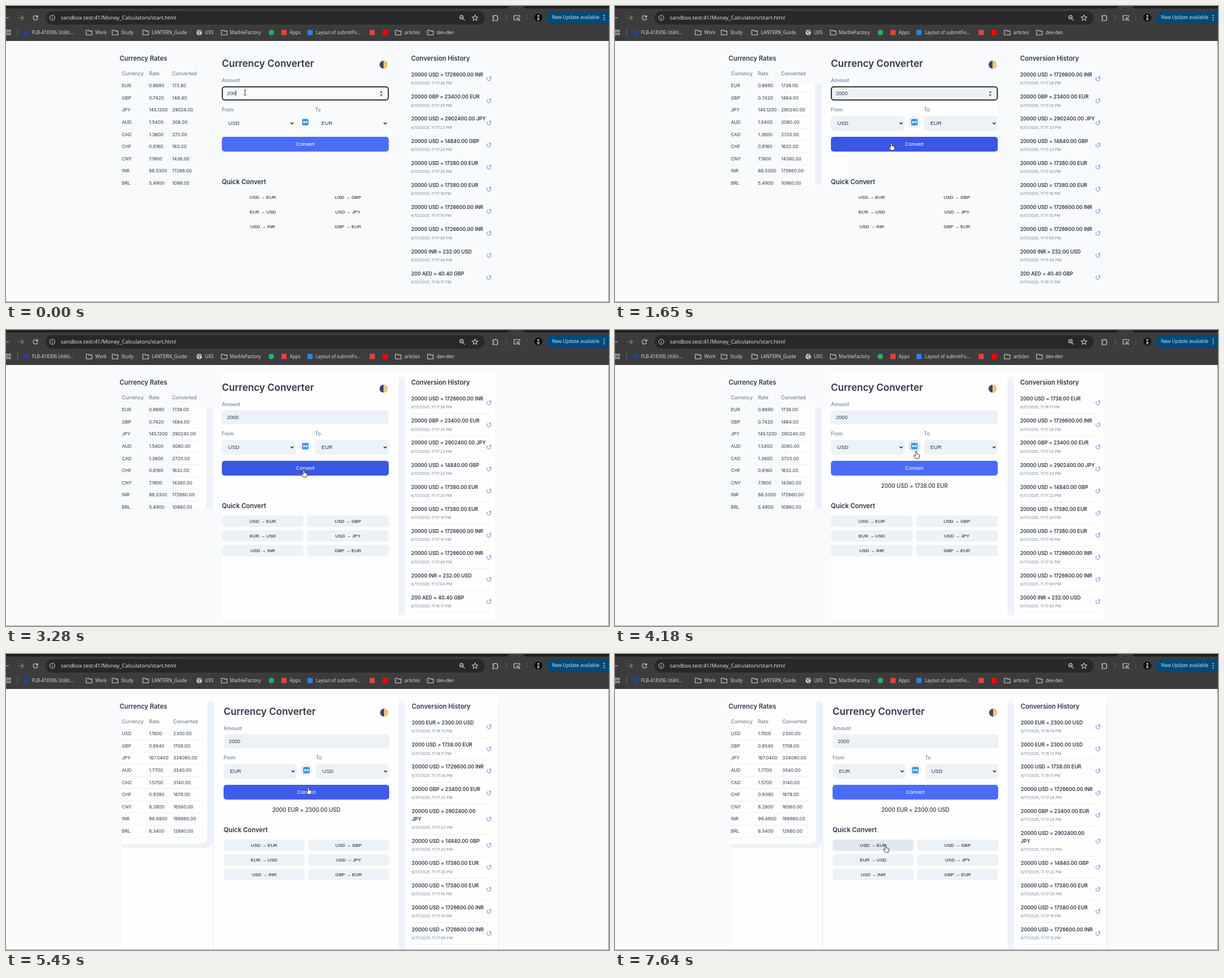
An HTML page with a canvas for the animation above (8 s loop, 1067 px wide and 525 px high).

```html
<!DOCTYPE html>
<html lang="en">
<head>
<meta charset="utf-8">
<title>Currency Converter</title>
<style>
html, body { margin: 0; width: 100%; height: 100%; overflow: hidden; background: #f8fafc; }
canvas { display: block; width: 1067px; height: 525px; }
</style>
</head>
<body>
<canvas id="stage"></canvas>
<script>
const W = 1067, H = 525, LOOP = 8000;
const canvas = document.getElementById('stage');
const ratio = window.devicePixelRatio || 1;
canvas.width = Math.round(W * ratio);
canvas.height = Math.round(H * ratio);
const c = canvas.getContext('2d');
c.scale(ratio, ratio);

const UI = 'Inter, sans-serif', FORM = '"Liberation Sans", Arial, sans-serif', BAR = '"Open Sans", sans-serif';
const INK = '#2d3748', MUTED = '#718096', FIELD = '#edf2f7', LINE = '#e6ebf1', CARD = '#fefefe', BLUE = '#4a6cf7';

// Screen updates: time, pointer x, pointer y
const steps = [
  [0, 423, 154], [180, 423, 154], [740, 424, 157], [920, 430, 172], [1100, 445, 198],
  [1280, 463, 225], [1460, 480, 241], [1650, 489, 243], [1820, 495, 247], [2000, 508, 252],
  [2180, 517, 253], [2360, 523, 250], [2730, 526, 249], [2910, 527, 248], [3280, 527, 248],
  [3460, 527, 248], [3830, 528, 246], [4010, 531, 226], [4180, 533, 215], [4360, 532, 211],
  [4540, 531, 207], [4910, 531, 207], [5090, 531, 212], [5270, 532, 224], [5450, 535, 236],
  [5630, 536, 239], [5810, 536, 240], [6370, 536, 240], [6920, 534, 247], [7100, 528, 272],
  [7280, 512, 315], [7460, 488, 348], [7640, 479, 339]
];

// Areas where the card surfaces become visible: time, x, y, w, h
const reveals = [
  [180, 306, 138, 106, 179], [740, 411, 148, 26, 20], [1280, 411, 148, 266, 110],
  [1820, 411, 150, 119, 117], [3280, 382, 73, 483, 439], [4910, 205, 73, 667, 452]
];

const codes = ['GBP', 'JPY', 'AUD', 'CAD', 'CHF', 'CNY', 'INR', 'BRL'];
const rates = {
  USD: [0.869, 0.742, 145.12, 1.54, 1.36, 0.816, 7.19, 86.33, 5.49],
  EUR: [1.15, 0.854, 167.04, 1.77, 1.57, 0.939, 8.28, 99.49, 6.34]
};

const log = [
  ['2000 EUR = 2300.00 USD', '18:14'], ['2000 EUR = 2300.00 USD', '18:13'],
  ['2000 USD = 1738.00 EUR', '18:11'], ['20000 USD = 1726600.00 INR', '17:26'],
  ['20000 GBP = 23400.00 EUR', '17:25'], ['20000 USD = 2902400.00 JPY', '17:23'],
  ['20000 USD = 14840.00 GBP', '17:22'], ['20000 USD = 17380.00 EUR', '17:20'],
  ['20000 USD = 17380.00 EUR', '17:18'], ['20000 USD = 1726600.00 INR', '17:10'],
  ['20000 USD = 1726600.00 INR', '17:08'], ['20000 INR = 232.00 USD', '17:04'],
  ['200 AED = 40.40 GBP', '16:17']
];

const quick = ['USD → EUR', 'USD → GBP', 'EUR → USD', 'USD → JPY', 'USD → INR', 'GBP → EUR'];

// y is the middle of the capitals
function text(s, x, y, size, color = INK, weight = 400, font = UI, align = 'left') {
  c.font = `${weight} ${size}px ${font}`;
  c.fillStyle = color;
  c.textAlign = align;
  c.fillText(s, x, y + size * 0.36);
}

function rect(x, y, w, h, color) {
  c.fillStyle = color;
  c.fillRect(x, y, w, h);
}

function round(x, y, w, h, r, color) {
  c.beginPath();
  c.roundRect(x, y, w, h, r);
  c.fillStyle = color;
  c.fill();
}

function disc(x, y, r, color) {
  c.beginPath();
  c.arc(x, y, r, 0, Math.PI * 2);
  c.fillStyle = color;
  c.fill();
}

function stroke(d, x, y, color, width = 1.2) {
  c.save();
  c.translate(x, y);
  c.strokeStyle = color;
  c.lineWidth = width;
  c.stroke(new Path2D(d));
  c.restore();
}

function fill(d, x, y, color) {
  c.save();
  c.translate(x, y);
  c.fillStyle = color;
  c.fill(new Path2D(d));
  c.restore();
}

function mix(a, b, k) {
  return `rgb(${a.map((v, i) => Math.round(v + (b[i] - v) * k))})`;
}

function browser() {
  const icon = '#d0d3d6';
  rect(0, 0, W, 62, '#3c3c3c');
  round(-10, -10, 900, 14.5, 5, '#1f2020');
  round(916, -10, 170, 14.5, 5, '#1f2020');
  round(70, 9, 777, 24, 12, '#282828');

  stroke('M5 0H-4M0-4L-4 0 0 4', 0, 21, icon);
  stroke('M-4 0H5M1-4L5 0 1 4', 26, 21, '#85888b');
  stroke('M3.6-2A4 4 0 1 0 4 1M4-4.5V-1.4H.8', 52, 21, icon);
  stroke('M-4.5 0A4.5 4.5 0 1 0 4.5 0A4.5 4.5 0 1 0-4.5 0M0-.5V2.5M0-2.5V-1.4', 82, 21, icon, 1);
  text('sandbox.test:41/Money_Calculators/start.html', 97, 21, 9.5, '#e8eaed', 400, BAR);

  stroke('M-4.2-1.2A3.1 3.1 0 1 0 2-1.2A3.1 3.1 0 1 0-4.2-1.2M1.2 1.2L4.8 4.8M-2.7-1.2H.5', 807, 21, icon);
  stroke('M0-5L1.5-1.7 5-1.4 2.3.9 3.1 4.4 0 2.6-3.1 4.4-2.3.9-5-1.4-1.5-1.7Z', 830, 21, icon, 1.1);
  stroke('M-4.5-3.5H-1.6A1.7 1.7 0 0 1 1.6-3.5H3.5V-.8A1.7 1.7 0 0 1 3.5 2.4V5H-4.5V2.4A1.6 1.6 0 0 0-4.5-.8Z', 866, 21, icon);
  rect(885, 15, 1, 12, '#5f6266');
  stroke('M-1 4H-5V-4H5V-1M0 1.8A2 2 0 1 0 4 1.8A2 2 0 1 0 0 1.8M3.6 3.4L5.6 5.2', 904, 21, icon);
  rect(921, 15, 1, 12, '#4d5053');

  disc(942, 20.5, 7, '#0b0b0b');
  disc(942, 17.5, 1.8, '#b5b5b5');
  round(940, 20, 4, 6, 2, '#8d8d8d');
  round(957, 9.5, 120, 22.5, 11, '#004a77');
  text('New Update available', 966, 20.5, 8.3, '#d3ebfd', 400, BAR);
  for (const dy of [-4, 0, 4]) disc(1058.5, 20.5 + dy, 1.1, '#d3ebfd');

  stroke('M-3.5-4.5H-.5V-1.5H-3.5ZM1.5-4.5H4.5V-1.5H1.5ZM-3.5 1H-.5V4H-3.5ZM1.5 1H4.5V4H1.5Z', 3.5, 47, icon, 1);
  rect(20, 41, 1, 12, '#6a6d70');
  disc(36, 47, 5, '#26418f');
  for (const x of [147, 193, 247, 386, 694, 751]) {
    stroke('M-5-4H-1.2L.2-2.6H5V4.2H-5Z', x, 47, icon, 1.1);
  }
  disc(342, 47, 4.8, icon);
  stroke('M-3.5-2L-1-.5 0 2 1 4M0-4.5L1-2 4-1', 342, 47, '#3c3c3c', 1.2);
  disc(469.5, 47, 4.8, '#1fb36b');
  for (const [x, color] of [[492, '#ea4335'], [538, '#2684ff'], [648, '#ea4335'], [671, '#ff0000']]) {
    rect(x - 4.5, 42.5, 9, 9, color);
  }
  const marks = [
    ['FLB-418306 Utiliti...', 46], ['Work', 158], ['Study', 204], ['LANTERN_Guide', 258], ['UX5', 352],
    ['MarbleFactory', 396], ['Apps', 502], ['Layout of submitFo...', 548], ['articles', 705], ['dev-den', 762]
  ];
  for (const [s, x] of marks) text(s, x, 47, 8.2, '#dfe1e4', 400, BAR);
}

function layout(swapped) {
  const x = swapped ? 385 : 382, r = swapped ? 678 : 677.3, mid = (x + r) / 2;
  return { x, r, w: r - x, mid, to: mid + 17, sel: mid - 17 - x, hist: swapped ? 718 : 717 };
}

function gap(x, w, open) {
  const g = c.createLinearGradient(0, 78, 0, 512);
  g.addColorStop(0, 'rgba(237,241,248,0)');
  g.addColorStop(0.03, '#edf1f8');
  g.addColorStop(0.97, '#edf1f8');
  g.addColorStop(1, open ? '#edf1f8' : 'rgba(237,241,248,0)');
  rect(x, 78, w, H - 78, g);
}

// Wrapped rows are one text line taller
function historyRows(s) {
  let y = 122;
  return log.slice(s.first, s.first + 10).map(([title, time]) => {
    const wrap = s.swapped && title.endsWith('JPY');
    const row = { y, time, lines: wrap ? [title.slice(0, -4), 'JPY'] : [title], extra: wrap ? 14.2 : 0 };
    y += 39.17 + row.extra;
    return row;
  });
}

function surfaces(s, L, rows) {
  c.save();
  c.beginPath();
  for (const [t, x, y, w, h] of reveals) if (s.t >= t) c.rect(x, y, w, h);
  c.clip();
  rect(0, 62, W, H, CARD);
  if (s.swapped) {
    round(190, 84, 176, 260, [0, 0, 14, 0], '#edf1f8');
    round(190, 70, 166, 266.5, [0, 0, 10, 0], CARD);
    gap(366, 2, true);
    gap(870, 2, true);
  } else {
    gap(354, 12, true);
  }
  gap(694.5, 11.5, s.swapped);

  for (let i = 0; i < 9; i++) rect(205, 152 + i * 21.58, s.swapped ? 139 : 137.5, 0.8, LINE);
  for (const r of rows) rect(L.hist, r.y + 26.2 + r.extra, 859 - L.hist, 0.8, LINE);

  round(L.x, 142.5, L.w, 25, 5, FIELD);
  round(L.x, 195, L.sel, 26, 5, FIELD);
  round(L.to, 195, L.sel, 26, 5, FIELD);
  disc(L.mid, 206, 11, s.onSwap ? '#e2e8f0' : FIELD);
  const half = (L.w - 6) / 2;
  quick.forEach((q, i) => {
    const x = L.x + (i % 2) * (half + 6), y = 329 + (i >> 1) * 26.1;
    round(x, y, half, 20.2, 5, i === 0 && s.onQuick ? '#e2e8f0' : FIELD);
  });
  c.restore();
}

function ratesTable(s) {
  const col = s.swapped ? 296 : 294;
  text('Currency Rates', 201, 92.5, 11.3, INK, 600);
  text('Currency', 205, 120, 8.7, MUTED, 500);
  text('Rate', 253, 120, 8.7, MUTED, 500);
  text('Converted', col, 120, 8.7, MUTED, 500);
  rates[s.from].forEach((rate, i) => {
    const y = 141.3 + i * 21.58;
    text(i ? codes[i - 1] : s.to, 205, y, 8.1);
    text(rate.toFixed(4), 253, y, 8.1);
    text((s.amount * rate).toFixed(2), col, y, 8.1);
  });
}

function swapIcon(x, y) {
  round(x - 5.7, y - 5.7, 11.4, 11.4, 2, '#3c97e6');
  fill('M-4.5 0L-2-2.4V-.8H2V-2.4L4.5 0 2 2.4V.8H-2V2.4Z', x, y, '#fff');
}

function moon(x, y) {
  disc(x, y, 7, '#47406b');
  c.beginPath();
  c.arc(x, y, 7, -Math.PI / 2, Math.PI / 2);
  c.fillStyle = '#f3cd7d';
  c.fill();
  disc(x + 3.5, y - 2, 1.2, '#dcae60');
  disc(x + 2.5, y + 3, 1, '#dcae60');
}

function converter(s, L) {
  text('Currency Converter', L.x, 102, 17, INK, 600);
  moon(L.swapped ? 669 : L.r - 9.3, 104);
  text('Amount', L.x, 131.5, 8.7, MUTED, 500);
  text('From', L.x, 184, 8.7, MUTED, 500);
  text('To', L.to, 184, 8.7, MUTED, 500);

  text(String(s.amount), L.x + 9, 154.7, 9.3, INK, 400, FORM);
  if (s.focus) {
    const end = L.x + 9 + c.measureText(s.amount).width;
    c.beginPath();
    c.roundRect(L.x + 0.8, 143.3, L.w - 1.6, 23.4, 4.5);
    c.strokeStyle = '#101114';
    c.lineWidth = 1.7;
    c.stroke();
    round(659, 149.5, 10, 11.5, 1, '#f1f3f5');
    fill('M-2.6-1.5H2.6L0-4.6ZM-2.6 1.5H2.6L0 4.6Z', 664, 155.2, '#55585c');
    if (s.caret) rect(end, 149.5, 0.9, 10, '#222');
  }

  for (const [x, code] of [[L.x, s.from], [L.to, s.to]]) {
    text(code, x + 11.3, 208, 9.4, INK, 400, FORM);
    stroke('M-2.6-1.3L0 1.3 2.6-1.3', x + L.sel - 6.4, 208, '#1c1f24', 1.4);
  }
  swapIcon(L.mid, 206);

  round(L.x, 232, L.w, 26.3, 5, mix([74, 108, 247], [58, 86, 228], s.hover));
  text('Convert', L.mid, 245, 9.3, '#fff', 400, FORM, 'center');
  if (s.result) text(s.result, L.swapped ? L.mid : 529.8, 277, 9.7, INK, 500, UI, 'center');

  text('Quick Convert', L.x, 312, 11.3, INK, 600);
  const half = (L.w - 6) / 2;
  quick.forEach((q, i) => {
    const x = L.x + half / 2 + (i % 2) * (half + 6);
    text(q, x, 339 + (i >> 1) * 26.1, 8.1, '#111', 400, FORM, 'center');
  });
}

function history(L, rows) {
  text('Conversion History', L.hist, 92.5, 11.2, INK, 600);
  for (const r of rows) {
    r.lines.forEach((s, i) => text(s, L.hist, r.y + i * 14.2, 8.75, INK, 600));
    text(`6/17/2025, 11:${r.time} PM`, L.hist, r.y + 15 + r.extra, 6.75, MUTED);
    stroke('M2-3A3.5 3.5 0 1 1-2-3M4-3.6H1.4V-.9', 854.5, r.y + 7.2 + r.extra / 2, BLUE, 0.9);
  }
}

function pointer(kind, x, y) {
  if (kind === 'text') {
    stroke('M-2.3-4.8H-.6L0-4.2 .6-4.8H2.3M0-4.2V3.6M-2.3 4.2H-.6L0 3.6 .6 4.2H2.3', x, y, '#222', 0.9);
    return;
  }
  const d = kind === 'hand'
    ? 'M-1.2 1.2A1.2 1.2 0 0 1 1.2 1.2V5L4.6 5.8Q6.2 6.3 6 8L5.4 11Q5.1 13 4.1 13H.1Q-.9 13-1.7 11.6L-4.1 8.2Q-4.6 7.2-3.6 6.8Q-2.7 6.6-1.2 8.2Z'
    : 'M0 0V10.5L2.5 8.3 4 12 5.6 11.3 4.1 7.8 7.4 7.6Z';
  fill(d, x, y, '#fff');
  stroke(d, x, y, '#16181c', 0.9);
}

function stateAt(time) {
  const i = steps.findLastIndex(p => time >= p[0]);
  const [t, x, y] = steps[i];
  const swapped = t >= 4910;
  const onButton = p => p && p[2] >= 232 && p[2] <= 258;
  const s = {
    t, x, y, swapped,
    amount: t < 180 ? 200 : 2000,
    from: swapped ? 'EUR' : 'USD',
    to: swapped ? 'USD' : 'EUR',
    focus: t < 3280,
    caret: t < 150 || Math.floor((t - 150) / 500) % 2 === 0 && t < 3280,
    first: t < 3460 ? 3 : t < 4910 ? 2 : t < 6370 ? 1 : 0,
    hover: onButton(steps[i]) ? (onButton(steps[i - 1]) ? 1 : 0.75) : 0,
    onSwap: Math.hypot(x - 530, y - 206) < 11,
    onQuick: y >= 329 && y <= 349,
    result: t < 3460 ? '' : swapped ? '2000 EUR = 2300.00 USD' : '2000 USD = 1738.00 EUR'
  };
  s.kind = y < 168 ? 'text' : s.hover || s.onSwap || s.onQuick ? 'hand' : 'arrow';
  return s;
}

function draw() {
  const s = stateAt(performance.now() % LOOP);
  const L = layout(s.swapped);
  L.swapped = s.swapped;
  const rows = historyRows(s);
  rect(0, 0, W, H, '#f8fafc');
  surfaces(s, L, rows);
  ratesTable(s);
  converter(s, L);
  history(L, rows);
  browser();
  rect(1066, 62, 1, H, '#85888c');
  rect(0, 524, W, 1, '#a4a7ab');
  pointer(s.kind, s.x, s.y);
  requestAnimationFrame(draw);
}
draw();
</script>
</body>
</html>
```
